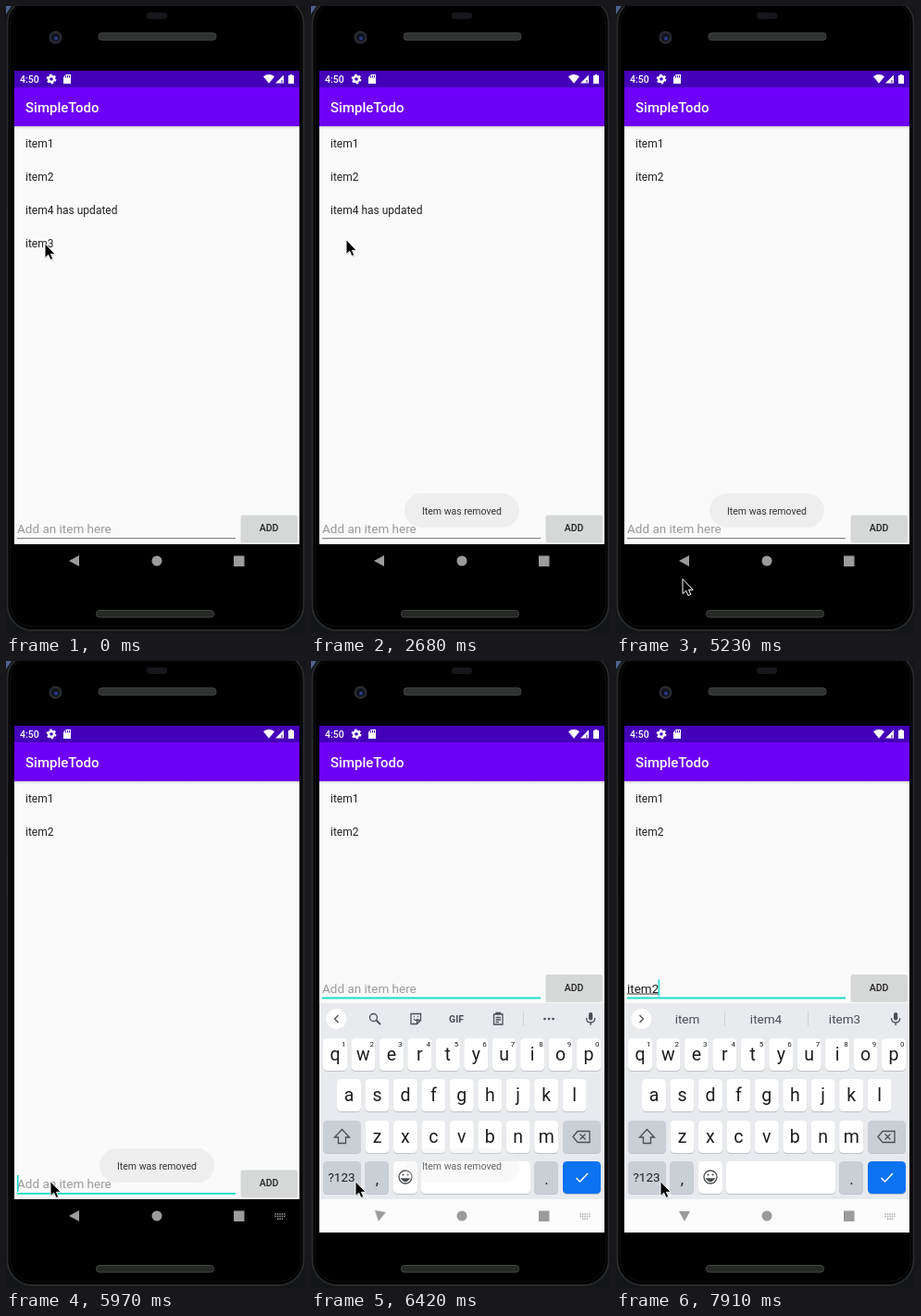
Recreate the animation shown at these times as an HTML page. Size 323 px wide and 678 px high, loop 8 s.

```html
<!DOCTYPE html>
<html lang="en">
<head>
<meta charset="utf-8">
<title>SimpleTodo</title>
<style>
  html, body { margin: 0; width: 100%; height: 100%; overflow: hidden; background: #000; }
  svg { display: block; width: 323px; height: 678px; font-family: Roboto, sans-serif; }
  .mid { text-anchor: middle; }
  .bold { font-weight: 500; }
  .item { font-size: 12px; fill: #212121; }
  .field { font-size: 13.5px; fill: #212121; }
  .line { fill: none; stroke: #4b4e53; stroke-width: 1.3; }
</style>
</head>
<body>
<svg viewBox="0 0 323 678">
  <defs>
    <linearGradient id="fall" x2="0" y2="1">
      <stop stop-color="#000" stop-opacity=".16"/><stop offset="1" stop-color="#000" stop-opacity="0"/>
    </linearGradient>
    <clipPath id="aboveNav"><rect x="9" y="70" width="308" height="512"/></clipPath>
  </defs>

  <g id="phone">
    <rect width="323" height="678" fill="#141517"/>
    <path d="M0 0H6L0 9Z" fill="#50628a"/>
    <rect x="1.5" y="-8" width="320" height="683" rx="27" fill="#000" stroke="#27292b" stroke-width="2"/>
    <rect x="4.5" y="-5" width="314" height="676" rx="24" fill="none" stroke="#111"/>
    <rect x="152" y="7" width="22" height="7" rx="3" fill="#15171b"/>
    <circle cx="53.5" cy="34" r="7" fill="#292b31"/>
    <circle cx="53.5" cy="34" r="4.5" fill="#11131d"/>
    <circle cx="54" cy="35" r="2" fill="#2c3b8c"/>
    <rect x="100" y="29" width="127" height="8" rx="3.5" fill="#303231" stroke="#414342"/>
    <rect x="97.500" y="653.5" width="127" height="7.500" rx="3.5" fill="#252825" stroke="#434543"/>
  </g>

  <g id="app">
    <rect x="9" y="70" width="308" height="512" fill="#fafafa"/>
    <rect x="9" y="130" width="308" height="3" fill="url(#fall)"/>
    <rect x="9" y="88" width="308" height="42" fill="#6f00f8"/>
    <rect x="9" y="70" width="308" height="18" fill="#4400b8"/>
    <text x="21" y="115" class="bold" font-size="15" fill="#fff">SimpleTodo</text>
    <g fill="#fff">
      <text x="15" y="83" class="bold" font-size="10.5">4:50</text>
      <circle cx="49" cy="79" r="3" fill="none" stroke="#fff" stroke-width="2.4"/>
      <circle cx="49" cy="79" r="4.6" fill="none" stroke="#fff" stroke-width="1.6" stroke-dasharray="2.4 2.417"/>
      <path d="M62 77L65 74H70V84H62Z"/>
      <path d="M64.500 75.500v2M66.500 75v2.500M68.500 75v2.500" stroke="#4400b8"/>
      <path d="M278 76.300Q284 71.500 290 76.300L284 83.700Z"/>
      <path d="M291 83.500L300 74.500V83.500Z"/>
      <path d="M297 80h2v3h-2z" fill="#4400b8" opacity=".5"/>
      <path d="M305 75h1.700v-1h2.600v1H311V84H305Z"/>
    </g>
    <text x="21" y="152.500" class="item">item1</text>
    <text x="21" y="188.500" class="item">item2</text>
    <text x="21" y="224.500" class="item" id="updated">item4 has updated</text>
    <text x="21" y="260.500" class="item" id="third">item3</text>
  </g>

  <rect id="navLight" x="9" y="582" width="308" height="36" fill="#fcfcfc"/>
  <g id="nav" fill="#9b9b9b">
    <g transform="translate(74 600)"><path id="back" d="M-6 0L5 -6V6Z"/></g>
    <circle cx="163" cy="600" r="5.5"/>
    <rect x="246" y="594.500" width="11.500" height="11.500"/>
    <path id="switcher" d="M290.500 598H302M290.500 600.500H302M293 603.200H299.500" fill="none" stroke="#a6a6a6" stroke-width="1.400" stroke-dasharray="1.400 1"/>
  </g>

  <g id="entry">
    <text x="12" y="570" class="field" id="hint" style="fill:#9a9a9a">Add an item here</text>
    <g id="typed"></g>
    <rect id="idleLine" x="12" y="575" width="236" height="1.200" fill="#858585"/>
    <rect id="focusLine" x="12" y="575" width="236" height="1.800" fill="#03dac5"/>
    <rect id="caret" x="12" y="556" width="1.500" height="18" fill="#03dac5"/>
    <rect x="253.500" y="551" width="61.500" height="29.500" rx="2" fill="#000" opacity=".13"/>
    <rect x="254" y="550.500" width="60" height="28.500" rx="1.500" fill="#d6d7d7"/>
    <text x="284" y="568.300" class="mid bold" font-size="10.5" fill="#212121">ADD</text>
  </g>

  <g clip-path="url(#aboveNav)"><g id="keyboard">
    <rect x="9" y="370" width="308" height="248" fill="#e8eaee"/>
    <g id="keys"></g>
    <g id="tools" class="line">
      <circle cx="27.500" cy="387" r="11" fill="#fff" stroke="none"/>
      <path d="M29.500 383l-4 4 4 4"/>
      <circle cx="67.500" cy="385.500" r="4"/><path d="M70.500 388.500l4.500 4.500" stroke-width="1.800"/>
      <path d="M108 381.500h10.500v7l-4 4H108zM118.500 388.500h-4v4M111 387q2 3 4.500 0M111 384.500h1M115 384.500h1"/>
      <text x="157" y="391" class="mid" font-size="10.5" font-weight="700" fill="#4b4e53" stroke="none">GIF</text>
      <path d="M197.500 382h9.500v11h-9.500zM200 382v-1.500h4.500V382M199.500 385.500h5.500M199.500 388h5.500M199.500 390.500h3.500"/>
      <path d="M229.500 379v16" stroke="#d0d2d6" stroke-width="1"/>
      <path d="M252.500 387h.1M257 387h.1M261.500 387h.1" stroke-width="2.600" stroke-linecap="round"/>
    </g>
    <g id="suggestBar" class="line">
      <circle cx="27.500" cy="387" r="11" fill="#fff" stroke="none"/>
      <path d="M25.500 383l4 4-4 4"/>
      <path d="M117.500 379v16M207.500 379v16" stroke="#d0d2d6" stroke-width="1"/>
    </g>
    <g id="suggestions" font-size="13.5" fill="#4b4e53" class="mid"></g>
    <g class="line">
      <rect x="300" y="380" width="4.200" height="8.500" rx="2.100" fill="#4b4e53" stroke="none"/>
      <path d="M297.500 386q0 5 4.600 5t4.600-5M302.100 391v3"/>
    </g>
  </g></g>

  <g id="toast">
    <rect id="toastBack" x="101" y="527" width="124" height="37" rx="18.500" fill="#eee"/>
    <text x="163" y="550" class="mid" font-size="10.5" fill="#333">Item was removed</text>
  </g>

  <g id="pointer">
    <path d="M1 1V16L4.500 13L7 18.500L9.500 17.500L7.200 12.300H12Z" opacity=".22"/>
    <path d="M0 -.5V15.500L3.700 12.200L6 17.500L8.800 16.300L6.500 11.300H11.200Z" stroke="#fff" stroke-width="1"/>
  </g>
</svg>
<script>
const LOOP = 8000;
const $ = id => document.getElementById(id);

// Held values: each [time, value] lasts until the next one.
function hold(el, prop, steps) {
  const frames = steps.map(([t, v]) => ({ offset: t / LOOP, [prop]: v, easing: 'steps(1, end)' }));
  frames.push({ offset: 1, [prop]: steps.at(-1)[1] });
  el.animate(frames, { duration: LOOP, iterations: Infinity });
}
const show = (el, from, to = LOOP) =>
  hold(el, 'opacity', [...(from ? [[0, 0]] : []), [from, 1], ...(to < LOOP ? [[to, 0]] : [])]);

// Keyboard
const key = (x, y, w, fill = '#fff') =>
  `<rect x="${x}" y="${y + 1}" width="${w}" height="35" rx="4.500" fill="#bfc2c8"/>
   <rect x="${x}" y="${y}" width="${w}" height="35" rx="4.500" fill="${fill}"/>`;
const label = (x, y, size, text) =>
  `<text x="${x}" y="${y}" class="mid" font-size="${size}" fill="#1c1d20">${text}</text>`;
const GREY = '#caced5', PITCH = 30.45;
let keys = '';
[['qwertyuiop', 26, 408], ['asdfghjkl', 41, 452], ['zxcvbnm', 71.5, 497]].forEach(([row, x0, y], r) =>
  [...row].forEach((c, i) => {
    const x = x0 + i * PITCH;
    keys += key(x - 13, y, 26) + label(x, y + 24, 19.5, c);
    if (!r) keys += label(x + 9.300, y + 9, 8, (i + 1) % 10);
  }));
keys += key(13, 497, 41, GREY) + key(272, 497, 41, GREY) + key(13, 541, 41, GREY)
  + key(58, 541, 26, GREY) + key(89, 541, 26) + key(119, 541, 118) + key(241, 541, 26, GREY)
  + key(272, 541, 41, '#0b72f1')
  + label(33, 563, 13.5, '?123') + label(71.5, 566, 17, ',') + label(254.5, 566, 17, '.')
  + `<g class="line">
      <path d="M33.500 506.500L25.500 515H29.500V521.500H37.500V515H41.500Z"/>
      <path d="M283 514.500L288 508.500H301V520.500H288ZM290.500 511.500L296.500 517.500M296.500 511.500L290.500 517.500"/>
      <circle cx="102" cy="558" r="7"/><path d="M98 560q4 5 8 0z" fill="#4b4e53"/>
      <path d="M99.500 555.500h.1M104.500 555.500h.1" stroke-width="2" stroke-linecap="round"/>
      <path d="M286.500 559l4 4 8.500-9" stroke="#fff" stroke-width="1.500"/>
    </g>`;
$('keys').innerHTML = keys;

// Typing: start, end, text, caret x, underline end
const typing = [
  [6720, 6870, 'i', 15.5, 15.5], [6870, 7020, 'it', 20, 20], [7020, 7170, 'ite', 27, 27],
  [7170, 7320, 'item', 38, 27], [7320, 7910, 'item', 38, 38], [7910, LOOP, 'item2', 45.5, 46]
];
$('typed').innerHTML = typing.map(([, , text, , end]) =>
  `<g><text x="12" y="570" class="field">${text}</text><path d="M12 571.5H${end}" stroke="#333"/></g>`).join('');
typing.forEach(([from, to], i) => show($('typed').children[i], from, to));

const suggestions = [
  [6720, 6870, ['I', 'in', 'is']], [6870, 7020, ['it', 'its', 'it’s']],
  [7020, 7470, ['ite', 'item', 'items']], [7470, LOOP, ['item', 'item4', 'item3']]
];
$('suggestions').innerHTML = suggestions.map(([, , words]) =>
  `<g>${words.map((w, i) => `<text x="${77 + i * 85}" y="392">${w}</text>`).join('')}</g>`).join('');
suggestions.forEach(([from, to], i) => show($('suggestions').children[i], from, to));

// List and toast
hold($('third'), 'opacity', [[0, 1], [2380, .25], [2530, 0]]);
hold($('updated'), 'opacity', [[0, 1], [4180, .25], [4330, 0]]);
hold($('toast'), 'opacity', [[0, 0], [2530, .6], [2680, 1], [6420, .75], [6570, 0]]);
hold($('toastBack'), 'opacity', [[0, 1], [6420, .45]]);

// Input focus and keyboard
show($('idleLine'), 0, 5820);
show($('focusLine'), 5820);
hold($('caret'), 'opacity', [[0, 0], [5820, 1], [6270, 0], [6720, 1]]);
hold($('caret'), 'transform', [[0, 'none'], ...typing.map(([t, , , x]) => [t, `translateX(${x - 12}px)`])]);
show($('hint'), 0, 6720);
hold($('entry'), 'transform', [[0, 'none'], [6270, 'translateY(-211.5px)']]);
show($('keyboard'), 6270);
hold($('keyboard'), 'transform', [[0, 'translateY(40px)'], [6420, 'none']]);
show($('tools'), 0, 6720);
show($('suggestBar'), 6720);
show($('navLight'), 6270);
show($('switcher'), 5970);
hold($('back'), 'transform', [[0, 'none'], [6270, 'rotate(-40deg)'], [6420, 'rotate(-80deg)'], [6570, 'rotate(-90deg)']]);

// Pointer: time, x, y
const path = [
  [0, 42, 257], [600, 70, 292], [750, 165, 400], [900, 312, 541], [1050, 190, 410],
  [1190, 86, 296], [1340, 62, 275], [1490, 46, 260], [1640, 43, 258], [1780, 43, 259],
  [2530, 38, 253], [2980, 37, 254], [3280, 46, 246], [3430, 68, 230], [3580, 77, 223],
  [4780, 80, 270], [4930, 90, 400], [5080, 88, 530], [5230, 72, 620], [5370, 60, 629],
  [5520, 52, 590], [5670, 49, 568], [5820, 48, 563]
];
hold($('pointer'), 'transform', path.map(([t, x, y]) => [t, `translate(${x}px, ${y}px)`]));
</script>
</body>
</html>
```
